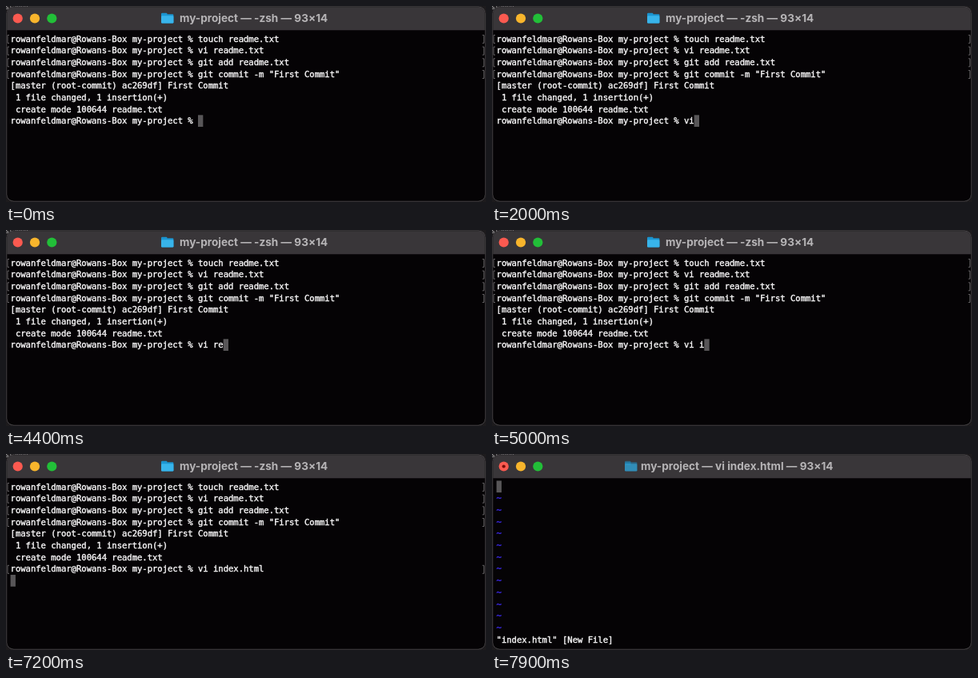
Write an HTML page with a canvas that moves like this. It is 600 by 245 pixels and loops after 8 s.

```html
<!DOCTYPE html>
<html lang="en">
<head>
<meta charset="utf-8">
<title>Terminal</title>
<style>
  html, body { margin: 0; width: 100%; height: 100%; overflow: hidden; background: #1d1b1d; }
  canvas { display: block; }
</style>
</head>
<body>
<canvas id="stage" width="600" height="245"></canvas>
<script>
const ctx = document.getElementById('stage').getContext('2d');
const LOOP = 8000;
const CELL = 6.335, ROW = 14.7, LEFT = 5.6, TOP = 33.4;
const MONO = '10.6px "DejaVu Sans Mono", monospace';
const SANS = 'bold 13.6px Inter, sans-serif';
const PROMPT = 'rowanfeldmar@Rowans-Box my-project % ';
const ENTER = 7200, EDITOR = 7300;

const history = [
  PROMPT + 'touch readme.txt',
  PROMPT + 'vi readme.txt',
  PROMPT + 'git add readme.txt',
  PROMPT + 'git commit -m "First Commit"',
  '[master (root-commit) ac269df] First Commit',
  ' 1 file changed, 1 insertion(+)',
  ' create mode 100644 readme.txt'
];

// Key presses: time and key, '<' deletes one character
const keys = [
  [1300, 'v'], [1400, 'i'], [2300, ' '], [3400, 're'], [3500, 'a'],
  [4400, '<'], [4600, '<'], [4700, '<'], [4900, 'i'], [5300, 'n'],
  [5600, 'd'], [5800, 'e'], [6000, 'x'], [6200, '.'], [6400, 'h'],
  [6500, 't'], [6600, 'm'], [6800, 'l']
];

function typedAt(t) {
  let s = '';
  for (const [at, key] of keys) {
    if (at > t) break;
    s = key === '<' ? s.slice(0, -1) : s + key;
  }
  return s;
}

function box(x, y, w, h, r, fill) {
  ctx.beginPath();
  ctx.roundRect(x, y, w, h, r);
  ctx.fillStyle = fill;
  ctx.fill();
}

function disc(x, y, r, fill) {
  ctx.beginPath();
  ctx.arc(x, y, r, 0, Math.PI * 2);
  ctx.fillStyle = fill;
  ctx.fill();
}

// A thin outline gives the glyphs their heavier weight
function print(row, text, color = '#f8f7f8') {
  ctx.font = MONO;
  ctx.fillStyle = ctx.strokeStyle = color;
  ctx.lineWidth = 0.4;
  ctx.lineJoin = 'round';
  const y = TOP + row * ROW + 11.1;
  [...text].forEach((ch, i) => {
    if (ch === ' ') return;
    ctx.fillText(ch, LEFT + i * CELL, y);
    ctx.strokeText(ch, LEFT + i * CELL, y);
  });
}

function cursor(row, col) {
  ctx.fillStyle = '#585658';
  ctx.fillRect(LEFT + col * CELL, TOP + row * ROW, CELL, ROW);
}

// Prompt marks at both edges of a finished command line
function marks(row) {
  const y = TOP + row * ROW + 3;
  ctx.strokeStyle = '#656365';
  ctx.lineWidth = 1;
  ctx.beginPath();
  for (const [x, d] of [[2, 2], [597.5, -2]]) {
    ctx.moveTo(x + d, y);
    ctx.lineTo(x, y);
    ctx.lineTo(x, y + 10);
    ctx.lineTo(x + d, y + 10);
  }
  ctx.stroke();
}

function folder(x, alpha) {
  ctx.globalAlpha = alpha;
  box(x, 8.8, 7.5, 5, 1.2, '#1b95d0');
  box(x, 10.3, 15.4, 11.2, 1.2, '#1b95d0');
  box(x, 12.2, 15.4, 9.3, 1.2, '#38b4ea');
  ctx.globalAlpha = 1;
}

function drawWindow(t) {
  ctx.fillStyle = '#1d1b1d';
  ctx.fillRect(0, 0, 600, 245);
  ctx.font = '8px "DejaVu Sans Mono", monospace';
  ctx.fillStyle = '#b5b3b5';
  ctx.fillText('staged', -1, 4);

  box(0.5, 0.5, 599, 244, 9, '#4e4b4e');
  box(1.2, 1.4, 597.6, 242.4, 8.5, '#050305');
  box(1.2, 1.6, 597.6, 28.6, [8.5, 8.5, 0, 0], '#393639');

  disc(14.7, 15.5, 6.1, '#fb5a50');
  disc(36, 15.5, 6.1, '#f8b52c');
  disc(57.3, 15.5, 6.1, '#22bf38');

  const busy = Math.min(1, Math.max(0, (Math.floor(t / 100) * 100 - ENTER) / 300));
  if (busy) {
    ctx.globalAlpha = busy;
    disc(14.7, 15.5, 2.1, '#780c08');
    ctx.globalAlpha = 1;
  }
  const editing = t >= EDITOR;
  folder(editing ? 166 : 194, 1 - 0.5 * busy);
  ctx.font = SANS;
  ctx.fillStyle = '#b6b4b6';
  ctx.fillText(`my-project — ${editing ? 'vi index.html' : '-zsh'} — 93×14`, editing ? 186 : 217, 20.3);
}

function drawShell(t) {
  history.forEach((line, i) => {
    print(i, line);
    if (i < 4) marks(i);
  });
  const line = PROMPT + typedAt(t);
  if (t < ENTER) {
    cursor(7, line.length);
  } else {
    marks(7);
    cursor(8, 0);
  }
  print(7, line);
}

function drawEditor() {
  cursor(0, 0);
  for (let row = 1; row < 13; row++) print(row, '~', '#3a28e0');
  print(13, '"index.html" [New File]');
}

const start = performance.now();
function frame() {
  const t = (performance.now() - start) % LOOP;
  drawWindow(t);
  if (t < EDITOR) drawShell(t);
  else drawEditor();
  requestAnimationFrame(frame);
}
frame();
</script>
</body>
</html>
```
